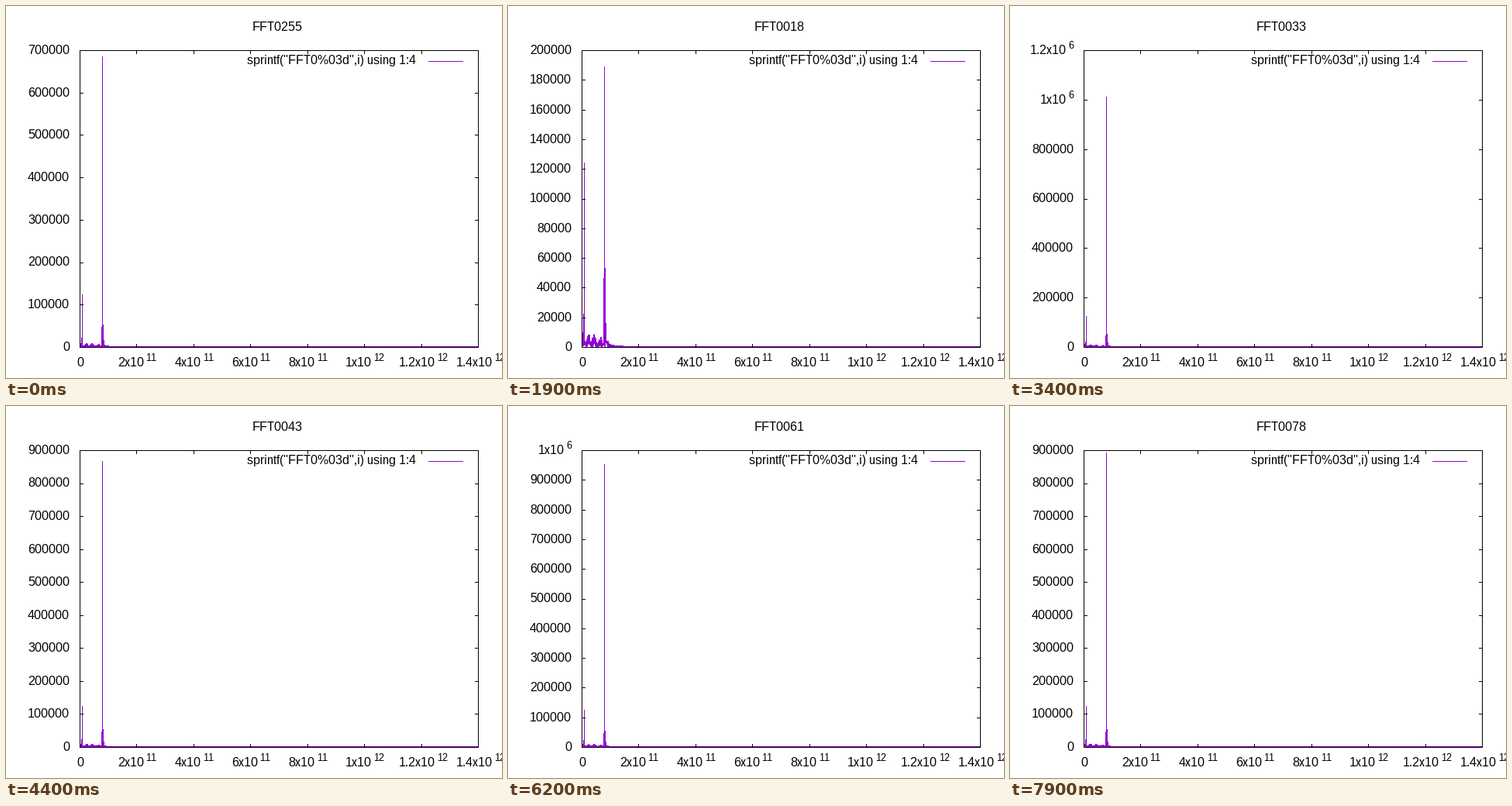
Animation of 640x480 px, one loop 8 s. Source, as a matplotlib script:

```python
import numpy as np
import matplotlib
import matplotlib.pyplot as plt
from matplotlib.animation import FuncAnimation

matplotlib.rcParams.update({
    "font.family": "Liberation Sans",
    "path.simplify": False,
    "text.hinting": "native",
    "text.hinting_factor": 1,
})

FRAMES, INTERVAL = 80, 100
LEFT, RIGHT, TOP, BOTTOM = 95.5, 609.5, 57.5, 440.5
PURPLE = "#9400d3"
PX = 0.72  # points per pixel at 100 dpi

fig = plt.figure(figsize=(6.4, 4.8), dpi=100, facecolor="white")
ax = fig.add_axes([0, 0, 1, 1])

# Turning points of the main peak (file index, thousands)
TURNS = [(-1, 685), (15, 130), (33, 1010), (52, 745), (66, 1035), (87, 800)]

# Four samples in each pixel column
columns = np.repeat(np.arange(96, 609), 4) + 0.5
noise = np.random.default_rng(4).uniform(0.05, 1, columns.size)


def main_peak(i):
    for (a, low), (b, high) in zip(TURNS, TURNS[1:]):
        if i <= b:
            ease = (1 - np.cos(np.pi * (i - a) / (b - a))) / 2
            return low + (high - low) * ease


def noise_floor(x):
    """Three humps below the main peak, then a 1/x tail."""
    humps = 3.5 + 6 * np.cos(np.pi * (x - 104) / 7.5) ** 2
    tail = 12 / (1 + 0.8 * np.maximum(x - 126, 0))
    skirt = 20 * np.exp(-((x - 124.5) / 0.8) ** 2)
    return np.where(x < 124, humps, tail) + skirt


def spectrum(i):
    jitter = np.random.default_rng(i + 100).uniform(0.88, 1.06, columns.size)
    amp = noise_floor(columns) * noise * jitter
    spikes = {97: 22, 98: 124, 123: 46, 124: main_peak(i), 125: 53, 126: 16}
    for col, height in spikes.items():
        amp[(col - 96) * 4 + 1] = height
    return amp * 1000


def line(x, y, color="black", z=3):
    ax.plot(x, y, color=color, lw=PX, antialiased=False, snap=False, zorder=z)


def text(x, y, s, size=16, ha="left"):
    ax.text(x, y, s, fontsize=size * PX, ha=ha, va="baseline", zorder=4)


def power_label(split, y, base, exp):
    text(split - 2.5, y, base, ha="right")
    text(split, y - 7, exp, 12.8)


def tick(x, y, dx, dy):
    x, y = np.floor([x, y]) + 0.5
    line([x, x + dx], [y, y + dy])


def axis_step(top):
    unit = 10 ** np.floor(np.log10(top))
    norm = top / unit
    return unit * (0.2 if norm < 2 else 0.5 if norm < 5 else 1)


def draw_x_axis():
    for k in range(8):
        x = LEFT + (RIGHT - LEFT) * k / 7
        tick(x, BOTTOM, 0, -4)
        tick(x, TOP, 0, 4)
        if k == 0:
            text(x, 465, "0", ha="center")
            continue
        mantissa, exp = (2 * k, 11) if k < 5 else (k / 5, 12)
        base = f"{mantissa:g}x10"
        power_label(x + (20.5 if "." in base else 11.5), 465, base, str(exp))


def draw_y_axis(step, count):
    for k in range(count + 1):
        y = BOTTOM - (BOTTOM - TOP) * k / count
        tick(LEFT, y, 4, 0)
        tick(RIGHT, y, -4, 0)
        value = int(round(k * step))
        base_y = round(y + 4.4)
        if value < 1_000_000:
            text(82, base_y, str(value), ha="right")
        else:
            power_label(74.9, base_y, f"{value / 1e6:g}x10", "6")


def draw(n):
    ax.cla()
    ax.set(xlim=(0, 640), ylim=(480, 0))
    ax.axis("off")
    i = n - 1
    amp = spectrum(i)
    step = axis_step(amp.max())
    count = int(np.ceil(amp.max() / step))

    ys = BOTTOM - (BOTTOM - TOP) * amp / (step * count)
    line(columns, ys, PURPLE, 2)
    line([LEFT, RIGHT, RIGHT, LEFT, LEFT], [TOP, TOP, BOTTOM, BOTTOM, TOP])
    draw_x_axis()
    draw_y_axis(step, count)

    text(350.5, 32, f"FFT0{i % 256:03d}", ha="center")
    text(420, 75, 'sprintf("FFT0%03d",i) using 1:4', ha="center")
    line([545.5, 589.5], [71.5, 71.5], PURPLE)
    return []


anim = FuncAnimation(fig, draw, frames=FRAMES, interval=INTERVAL,
                     init_func=lambda: draw(0), repeat=True, repeat_delay=0,
                     blit=False)
plt.show()
```
